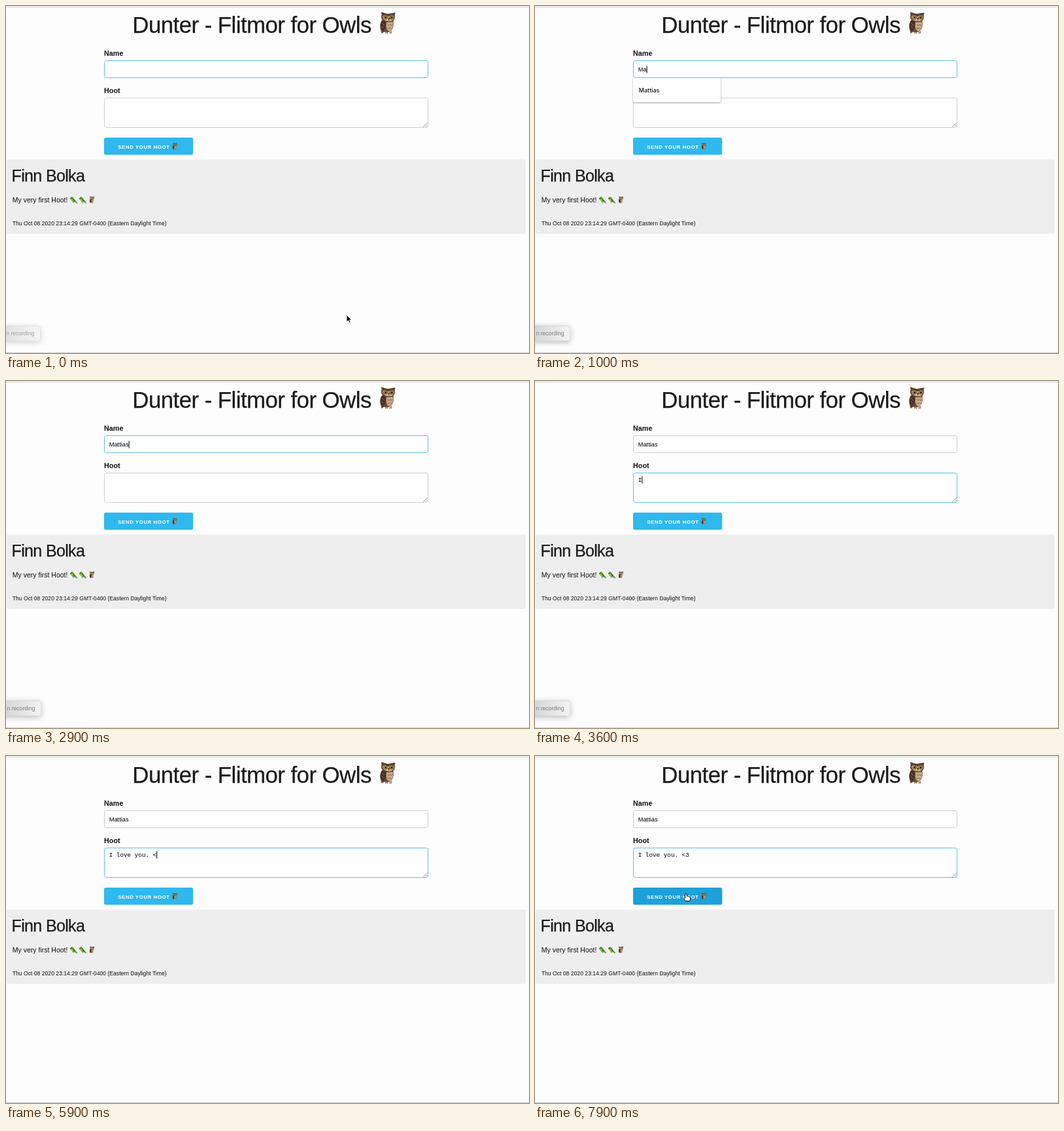
An HTML page that plays this animation: 800x530 px, repeating every 8000 ms.

```html
<!DOCTYPE html>
<html lang="en">
<head>
<meta charset="utf-8">
<title>Hoot form</title>
<style>
  html, body { margin: 0; width: 100%; height: 100%; overflow: hidden; background: #fdfdfe; }
  svg { display: block; width: 800px; height: 530px; font-family: "Liberation Sans", Arial, sans-serif; fill: #1b1b1b; }
  text { white-space: pre; }
  .label { font-size: 10.8px; font-weight: bold; fill: #111; }
  .heading { stroke: #1b1b1b; stroke-width: .25; }
  .field { fill: #fefefe; stroke: #c8c8cb; stroke-width: .9; }
  .focus { stroke: #50bbdc; }
  .typed { font-size: 9.3px; fill: #000; }
  .mono { font-family: "Liberation Mono", Courier, monospace; }
</style>
</head>
<body>
<svg viewBox="0 0 800 530">
  <defs>
    <symbol id="owl" viewBox="0 0 28 36" overflow="visible">
      <path d="M5 14Q1 21 3 28L4.5 34L8.5 31.5Q14 34 18.5 30Q25 24 22 13Z" fill="#6b4b37"/>
      <path d="M12 16Q23 14 22.5 20Q22 27 16.5 31Q10 29 12 16Z" fill="#c9a885"/>
      <path d="M14 20l2 2l2-2l2 2l1.5-2M13.5 25l2 2l2-2l2 2" fill="none" stroke="#80604a" stroke-width=".9"/>
      <path d="M5 14Q1 20 3.5 27L6 31.5Q12.500 26 11 16Z" fill="#46322a"/>
      <path d="M5 18l4 4M5 23l3 3" stroke="#93735a" stroke-width=".9"/>
      <path d="M4 1Q9 3 14 4Q20 3 25.500 2Q24 5 25 9Q25 16 15 17Q4 16 4 9Q5 5 4 1Z" fill="#594031"/>
      <path d="M6 8Q9 4 15 8.500Q21 4 24 8Q24 15 16 15.500Q6 15 6 8Z" fill="#d3b793"/>
      <g fill="#efbd3d" stroke="#32231b" stroke-width=".8"><circle cx="10.5" cy="9.5" r="2.8"/><circle cx="20" cy="9.5" r="2.8"/></g>
      <g fill="#111"><circle cx="10.700" cy="9.500" r="1.500"/><circle cx="20" cy="9.500" r="1.500"/></g>
      <path d="M14 10h3l-1.3 5z" fill="#46372d"/>
      <path d="M11 31v3.500m2.500-3v3m4-4v4m2-4.500v4" stroke="#8d7048" stroke-width="1.3"/>
    </symbol>
    <symbol id="parrot" viewBox="0 0 12 11" overflow="visible">
      <path d="M1 3Q1 0 4 .5Q6 1 7 4L12 10L10.5 10.5L7 8Q3 8 2 5Z" fill="#57a52a"/>
      <path d="M4 3Q7 4 9 8Q5 7 4 3Z" fill="#236e2b"/>
      <path d="M1 2L.3 4L2 4Z" fill="#4c4432"/>
      <path d="M2 4Q3 7 6 7L4 4Z" fill="#b7cf38"/>
      <circle cx="2.7" cy="2" r=".5" fill="#111"/>
      <path d="M5 7v2.5m1.5-2v2" stroke="#6c5940" stroke-width=".7"/>
    </symbol>
    <linearGradient id="fade"><stop offset=".5" stop-color="#d6d6d8"/><stop offset="1" stop-color="#f3f3f4"/></linearGradient>
    <filter id="shadow" x="-20%" y="-30%" width="140%" height="180%">
      <feDropShadow dx="0" dy="1" stdDeviation="1.3" flood-opacity=".38"/>
    </filter>
    <filter id="glow" x="-40%" y="-60%" width="180%" height="240%">
      <feDropShadow dx="0" dy="2" stdDeviation="4" flood-opacity=".25"/>
    </filter>
  </defs>

  <rect width="800" height="530" fill="#fdfdfe"/>
  <path d="M0 1.5H800M0 529.5H800" stroke="#cfcfd2"/>
  <text class="heading" x="193.3" y="41" font-size="34.9" letter-spacing="-.58">Dunter - Flitmor for Owls</text>
  <use href="#owl" x="570" y="8" width="28" height="36"/>

  <text class="label" x="150" y="76">Name</text>
  <rect id="nameBox" class="field" x="150.5" y="83.5" width="495" height="26" rx="2.8"/>
  <text id="name" class="typed" x="157.7" y="100"></text>

  <text class="label" x="150" y="133">Hoot</text>
  <rect id="hootBox" class="field" x="150.5" y="140.5" width="495" height="45" rx="2.8"/>
  <path d="M638.5 184.5l6-6m-2.5 6l2.5-2.5" stroke="#777" stroke-width=".8"/>
  <text id="hoot" class="typed mono" x="157.7" y="154"></text>
  <rect id="caret" width="1" height="11" fill="#000"/>

  <g id="menu">
    <path d="M150 110H284V145Q284 147 282 147H152Q150 147 150 145Z" fill="#fff" filter="url(#shadow)"/>
    <text x="158.8" y="132" font-size="9" font-weight="500" font-family="Inter, sans-serif" fill="#111">Mattias</text>
  </g>

  <rect id="button" x="150" y="201" width="136.3" height="26.3" rx="2.8"/>
  <text x="171.3" y="217.5" font-size="7.67" font-weight="bold" letter-spacing=".7" fill="#fff">SEND YOUR HOOT</text>
  <use href="#owl" x="254" y="209" width="8.5" height="10.5"/>

  <rect x="1" y="234.5" width="794" height="113.5" rx="3" fill="#eeeeef"/>
  <text class="heading" x="8.6" y="268" font-size="25.1" letter-spacing="-.7">Finn Bolka</text>
  <text x="9.8" y="300.3" font-size="10.5" fill="#111">My very first Hoot!</text>
  <use href="#parrot" x="97.5" y="291" width="12" height="11"/>
  <use href="#parrot" x="111.5" y="291" width="12" height="11"/>
  <use href="#owl" x="127" y="290.5" width="9" height="11"/>
  <text x="9.7" y="334.5" font-size="8.65" fill="#111">Thu Oct 08 2020 23:14:29 GMT-0400 (Eastern Daylight Time)</text>

  <g id="toast">
    <rect x="-60" y="488.5" width="112.5" height="23" rx="4" fill="url(#fade)" stroke="#d2d2d4" stroke-width=".8" filter="url(#glow)"/>
    <text x="43.3" y="503" font-size="8.6" text-anchor="end" fill="#7b7b7d">n recording</text>
  </g>

  <g id="mouse" stroke-linejoin="round">
    <path id="arrow" d="M0 0V10.5L2.5 8.3L4.2 12L6 11.2L4.4 7.6H7.8Z" fill="#000" stroke="#fff" stroke-width=".8"/>
    <path id="hand" d="M-1.2 1Q0-.7 1.2 1V4.2Q2.4 3.4 3.2 4.7Q4.6 4 5.1 5.3Q6.8 4.9 6.8 6.6Q6.8 9 5.5 11.5H-.8Q-2 9.2-4 7.3Q-3.8 5.5-1.2 7.2Z" fill="#fff" stroke="#000" stroke-width=".9"/>
  </g>
</svg>
<script>
const LOOP = 8000;
const el = id => document.getElementById(id);
const toggle = (id, on) => el(id).setAttribute("visibility", on ? "inherit" : "hidden");

// [time, text] for each key press
const nameKeys = [[-900, ""], [500, "M"], [700, "Ma"], [1200, "Mat"], [1500, "Matt"], [2900, "Mattias"]];
const message = "I love you. <3";
const pressed = [3500, 3900, 4000, 4100, 4200, 4300, 4400, 4500, 4600, 4800, 5000, 5200, 5500, 6100];
const hootKeys = [[3100, ""], ...pressed.map((t, i) => [t, message.slice(0, i + 1)])];

// [time, x, y]
const arriving = [[0, 521, 472], [100, 508, 460], [200, 478, 434], [300, 459, 418]];
const leaving = [[6900, 448, 416], [7000, 420, 392], [7100, 374, 353], [7200, 334, 319], [7300, 334, 319],
  [7400, 281.5, 267], [7500, 260, 243], [7600, 245, 229], [7700, 236, 217], [7900, 231, 210]];

const latest = (keys, t) => keys.filter(k => k[0] <= t).pop();

function along(path, t) {
  const i = path.findIndex(p => p[0] > t);
  if (i < 0) return path[path.length - 1].slice(1);
  const [a, b] = [path[i - 1], path[i]];
  const k = (t - a[0]) / (b[0] - a[0]);
  return [1, 2].map(n => a[n] + (b[n] - a[n]) * k);
}

function draw(now) {
  const t = Math.floor(now % LOOP / 100) * 100;
  const inHoot = t >= 3100;
  const [, name] = latest(nameKeys, t);
  const [, hoot] = latest(hootKeys, t) || [0, ""];
  el("name").textContent = name;
  el("hoot").textContent = hoot;
  el("nameBox").classList.toggle("focus", !inHoot);
  el("hootBox").classList.toggle("focus", inHoot);
  toggle("menu", t >= 500 && t < 2900);

  const [typedAt] = latest(inHoot ? hootKeys : nameKeys, t);
  const width = inHoot ? hoot.length * 5.58 : el("name").getComputedTextLength();
  el("caret").setAttribute("x", 157.7 + width);
  el("caret").setAttribute("y", inHoot ? 145.5 : 91.5);
  toggle("caret", Math.floor((t - typedAt) / 500) % 2 === 0);

  const shown = Math.min(1, t / 300);
  const gone = Math.min(1, Math.max(0, (t - 4700) / 600));
  el("toast").setAttribute("transform", `translate(${shown * 1.2 - 75 * gone * gone})`);
  el("toast").setAttribute("opacity", 0.7 + 0.3 * shown);

  const [x, y] = along(t < 6900 ? arriving : leaving, t);
  const hover = t >= 6900 && y < 227;
  el("mouse").setAttribute("transform", `translate(${x} ${y})`);
  toggle("mouse", t < 500 || t >= 6900);
  toggle("arrow", !hover);
  toggle("hand", hover);
  el("button").setAttribute("fill", hover ? "#1ea1d9" : "#2fb9ee");
}

const start = performance.now();
function tick() {
  draw(performance.now() - start);
  requestAnimationFrame(tick);
}
tick();
</script>
</body>
</html>
```
